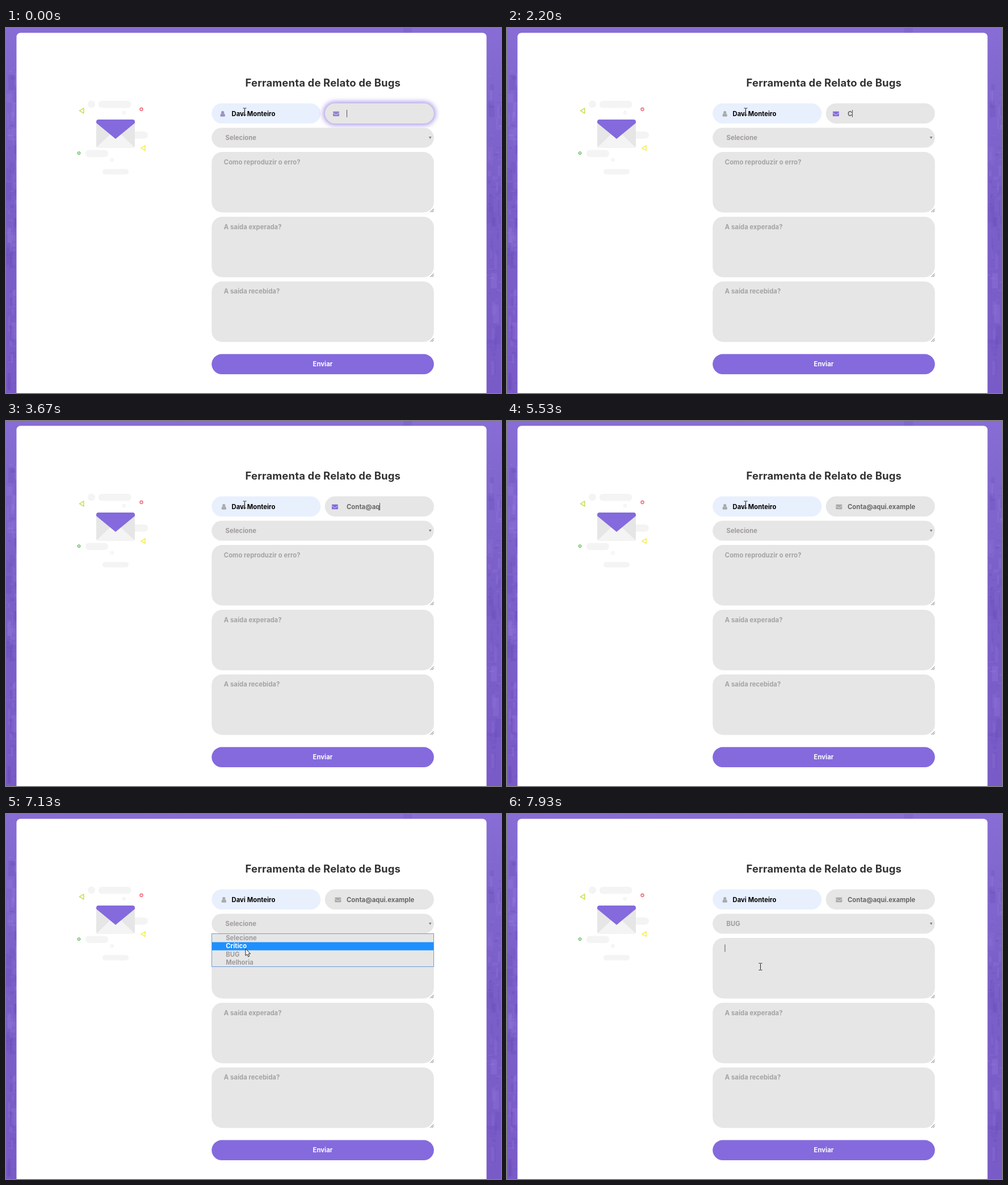
An HTML page that plays this animation: 872 by 642 pixels, repeating every 8 s.

```html
<!DOCTYPE html>
<html lang="pt-BR">
<head>
<meta charset="utf-8">
<title>Ferramenta de Relato de Bugs</title>
<style>
html, body { margin: 0; width: 100%; height: 100%; overflow: hidden; background: #7c60ca; }
svg { display: block; width: 872px; height: 642px; }
text { font: 700 11.25px Inter, sans-serif; letter-spacing: .05px; white-space: pre; }
.title { font-size: 18.5px; letter-spacing: .15px; fill: #333; }
.hint { fill: #a5a3a5; }
.pick { fill: #a09b9d; }
.mid { text-anchor: middle; }
.field { fill: #e6e6e6; }
.soft { fill: #f4f4f4; }
.line { fill: none; stroke-width: 1.3; }
</style>
</head>
<body>
<svg viewBox="0 0 872 642">
  <defs>
    <linearGradient id="sky" x1="0" y1="0" x2="0" y2="1">
      <stop offset="0" stop-color="#876dd5"/>
      <stop offset=".14" stop-color="#8168cf"/>
      <stop offset=".4" stop-color="#7b60c9"/>
      <stop offset="1" stop-color="#795bc7"/>
    </linearGradient>
    <filter id="blur" filterUnits="userSpaceOnUse" x="440" y="20" width="432" height="280">
      <feGaussianBlur id="dev" stdDeviation="4"/>
    </filter>
  </defs>
  <rect width="872" height="642" fill="url(#sky)"/>
  <g id="city"></g>
  <rect x="18.5" y="8.5" width="828" height="660" rx="7" fill="#fff"/>

  <g class="soft">
    <circle cx="150.5" cy="134" r="6.5"/>
    <rect x="163" y="128" width="57.5" height="12.5" rx="6.2"/>
    <rect x="205" y="182" width="45" height="12.5" rx="6.2"/>
    <rect x="140" y="214.5" width="40" height="12.5" rx="6.2"/>
    <rect x="170" y="248" width="46" height="9.5" rx="4.7"/>
  </g>
  <rect x="159" y="162" width="68" height="48.5" rx="3.5" fill="#e6e6e6"/>
  <path d="M160 209.5 193 178 226 209.5Q225 210.5 223 210.5H163Q161 210.5 160 209.5Z" fill="#f4f4f4"/>
  <path d="M159 167V165Q159 161 163 161H223Q227 161 227 165V167L193 195Z" fill="#846add"/>
  <g class="line">
    <path d="M129.5 145.5 136.8 141.2V149.8Z" stroke="#c3d83a"/>
    <path d="M238 211.2 245 207.2V215.2Z" stroke="#f1ec24"/>
    <circle cx="238.5" cy="143" r="2.5" stroke="#ee5a6a"/>
    <circle cx="128.5" cy="220" r="2.1" stroke="#57b553"/>
    <path d="M206 147h4v4h-4zM184.5 230h4v4h-4z" stroke="#e9e9e9" stroke-width="1"/>
  </g>

  <text class="title mid" x="558.3" y="102.7">Ferramenta de Relato de Bugs</text>

  <rect x="362.3" y="132.5" width="192" height="35.5" rx="17.75" fill="#e8f0fe"/>
  <rect id="glow" fill="#846add" filter="url(#blur)"/>
  <rect class="field" x="561.8" y="132.5" width="192" height="35.5" rx="17.75"/>
  <g id="user">
    <circle cx="4.2" cy="2.8" r="2.6"/>
    <path d="M0 8.4Q0 4.8 2.2 4.8Q4.2 6.4 6.2 4.8Q8.4 4.8 8.4 8.4Q8.4 10 6.8 10H1.6Q0 10 0 8.4Z"/>
  </g>
  <g id="mail">
    <rect width="11" height="8.5" rx="1"/>
    <path d="M0 2.3 4.4 5.5Q5.5 6.2 6.6 5.5L11 2.3" fill="none" stroke="#e6e6e6" stroke-width=".9"/>
  </g>
  <text x="397.5" y="154.6">Davi Monteiro</text>
  <text id="mailText" x="600" y="154.6" fill="#666"></text>

  <rect class="field" x="362.3" y="175.5" width="391.5" height="35" rx="17.5"/>
  <text id="choice" class="pick" x="386.5" y="197.2"></text>
  <path d="M744.8 191h4.8l-2.4 4.2z" fill="#85818a"/>

  <g id="areas"></g>
  <rect x="362.3" y="573.6" width="391.5" height="35.4" rx="17.7" fill="#846add"/>
  <text class="mid" x="558" y="595.2" fill="#fff">Enviar</text>

  <g id="list">
    <rect x="362.5" y="210.5" width="391" height="58" fill="#e6e6e6" stroke="#6f9bd8"/>
    <rect id="hover" x="363" width="390" height="14.3" fill="#1e90ff"/>
  </g>
  <rect id="caret" width="1" height="13" fill="#555"/>
  <path id="beam" d="M-3-6H-1Q0-6 0-5Q0-6 1-6H3M0-5V5M-3 6H-1Q0 6 0 5Q0 6 1 6H3" fill="none" stroke="#222" stroke-width="1"/>
  <path id="arrow" d="M0 0V12.2L2.8 9.7 4.7 13.9 6.8 13 4.9 8.9H8.6Z" fill="#fff" stroke="#222" stroke-width="1" stroke-linejoin="round"/>
</svg>
<script>
const $ = id => document.getElementById(id);
const NS = 'http://www.w3.org/2000/svg';
const LOOP = 8000, STEP = 1000 / 15;
const options = ['Selecione', 'Crítico', 'BUG', 'Melhoria'];
const hints = ['Como reproduzir o erro?', 'A saída experada?', 'A saída recebida?'];
const address = 'Conta@aqui.example';
const keyTimes = [2200, 2330, 2400, 2530, 2600, 2870, 3530, 3670, 3730,
  3870, 4000, 4070, 4130, 4270, 4670, 4730, 4870, 4930];
const caretOff = [[1000, 1530], [2070, 2200], [3400, 3530], [5130, 7930]];
// time, x, y of the pointer
const path = [[6070, 420.5, 147], [6270, 424, 158], [6470, 438, 185], [6670, 446, 198],
  [6870, 446, 199], [7000, 436, 217], [7130, 422, 237], [7330, 420, 247],
  [7600, 420, 250], [7800, 443, 266], [7870, 446.5, 268.5]];

function set(el, attrs) {
  for (const k in attrs) el.setAttribute(k, attrs[k]);
  return el;
}
function add(parent, tag, attrs, text = '') {
  const el = set(document.createElementNS(NS, tag), attrs);
  el.textContent = text;
  return parent.appendChild(el);
}
const show = (el, on) => { el.style.display = on ? '' : 'none'; };
const clamp = v => Math.min(1, Math.max(0, v));
const mix = (a, b, p) => a + (b - a) * p;
const within = (t, [a, b]) => t >= a && t < b;

function bezier(x1, y1, x2, y2) {
  const at = (a, b, s) => 3 * a * s * (1 - s) ** 2 + 3 * b * s * s * (1 - s) + s ** 3;
  return x => {
    x = clamp(x);
    let lo = 0, hi = 1;
    for (let i = 0; i < 22; i++) {
      const m = (lo + hi) / 2;
      if (at(x1, x2, m) < x) lo = m; else hi = m;
    }
    return at(y1, y2, hi);
  };
}
const ease = bezier(.25, .1, .25, 1);
const easeInOut = bezier(.42, 0, .58, 1);

function tint(p) {
  const grey = [170, 170, 170], purple = [132, 106, 221];
  return `rgb(${grey.map((g, i) => Math.round(mix(g, purple[i], p)))})`;
}

// faint skyline beside the card
let seed = 11;
const rnd = () => (seed = seed * 16807 % 2147483647) / 2147483647;
function buildCity() {
  add($('city'), 'rect', { x: 700, y: 0, width: 15, height: 9, fill: '#5a3fb0', opacity: .15 });
  for (const [left, width] of [[0, 19], [846, 26]]) {
    for (let i = 0; i < 95; i++) {
      const y = 75 + rnd() * 560, w = 2 + rnd() * 9;
      add($('city'), 'rect', {
        x: left + rnd() * (width - 2), y, width: w,
        height: rnd() < .5 ? 1 + rnd() * 2 : 5 + rnd() * 28,
        fill: rnd() < .5 ? '#b49cf0' : '#4b2fa0', opacity: .06 + rnd() * .09
      });
    }
  }
}

function buildForm() {
  hints.forEach((hint, i) => {
    const y = 218 + i * 113.9;
    add($('areas'), 'rect', { class: 'field', x: 362.3, y, width: 391.5, height: 106.5, rx: 18.75 });
    add($('areas'), 'path', {
      d: `M747.5 ${y + 106}l6-6m-3 6l3-3`, stroke: '#666', 'stroke-width': 1, fill: 'none'
    });
    add($('areas'), 'text', { class: 'hint', x: 383.8, y: y + 21.6 }, hint);
  });
  options.forEach((name, i) =>
    add($('list'), 'text', { x: 387.2, y: 222.2 + i * 14.25 }, name));
}

buildCity();
buildForm();
const firstHint = $('areas').querySelector('text');
const rows = [...$('list').querySelectorAll('text')];

function pointerAt(t) {
  if (t <= path[0][0]) return path[0].slice(1);
  const i = path.findIndex(p => p[0] > t);
  if (i < 0) return path[path.length - 1].slice(1);
  const [a, b] = [path[i - 1], path[i]];
  const p = (t - a[0]) / (b[0] - a[0]);
  return [mix(a[1], b[1], p), mix(a[2], b[2], p)];
}

function drawFocus(tick) {
  const age = 140 + Math.max(0, tick - 2) * STEP;
  const swap = ease(age / 400);
  const leave = ease((tick - 76) * STEP / 400);
  const userOn = 1 - swap, mailOn = swap * (1 - leave);
  set($('user'), { transform: `translate(${379.6 - 5.25 * userOn} 145.8)`, fill: tint(userOn) });
  set($('mail'), { transform: `translate(${579.3 - 5.4 * mailOn} 146.8)`, fill: tint(mailOn) });

  const p = easeInOut(age / 500), grow = 18.75 * p;
  show($('glow'), p < 1);
  set($('glow'), {
    x: 561.8 - grow, y: 132.5 - grow, width: 192 + 2 * grow, height: 35.5 + 2 * grow,
    rx: 17.75 + grow, opacity: .8 * (1 - p)
  });
  set($('dev'), { stdDeviation: 26 * p });
}

function drawSelect(t, y) {
  const open = t >= 6800 && t < 7470;
  const row = Math.min(3, Math.max(0, Math.floor((y - 211.3) / 14.3)));
  show($('list'), open);
  set($('hover'), { y: 211.2 + row * 14.25 });
  rows.forEach((el, i) => set(el, { fill: i === row ? '#fff' : '#a09b9d' }));
  $('choice').textContent = options[t < 7470 ? 0 : 2];
  return open;
}

function draw(time) {
  const tick = Math.floor((time + 4) / STEP);
  const t = Math.round(tick * STEP / 10) * 10;
  drawFocus(tick);

  const typed = keyTimes.filter(k => t >= k).length;
  $('mailText').textContent = address.slice(0, typed);
  const inArea = t >= 7930;
  const end = typed ? $('mailText').getComputedTextLength() : 0;
  show($('caret'), !caretOff.some(span => within(t, span)));
  set($('caret'), inArea ? { x: 383.5, y: 229.5 } : { x: 600 + Math.round(end), y: 144 });
  show(firstHint, !inArea);

  const [x, y] = pointerAt(t);
  const open = drawSelect(t, y);
  const arrow = open || within(y, [168, 218]);
  const place = { transform: `translate(${x} ${y})` };
  show($('arrow'), arrow);
  show($('beam'), !arrow);
  set($('arrow'), place);
  set($('beam'), place);
}

const start = performance.now();
function loop() {
  draw((performance.now() - start) % LOOP);
  requestAnimationFrame(loop);
}
loop();
</script>
</body>
</html>
```
